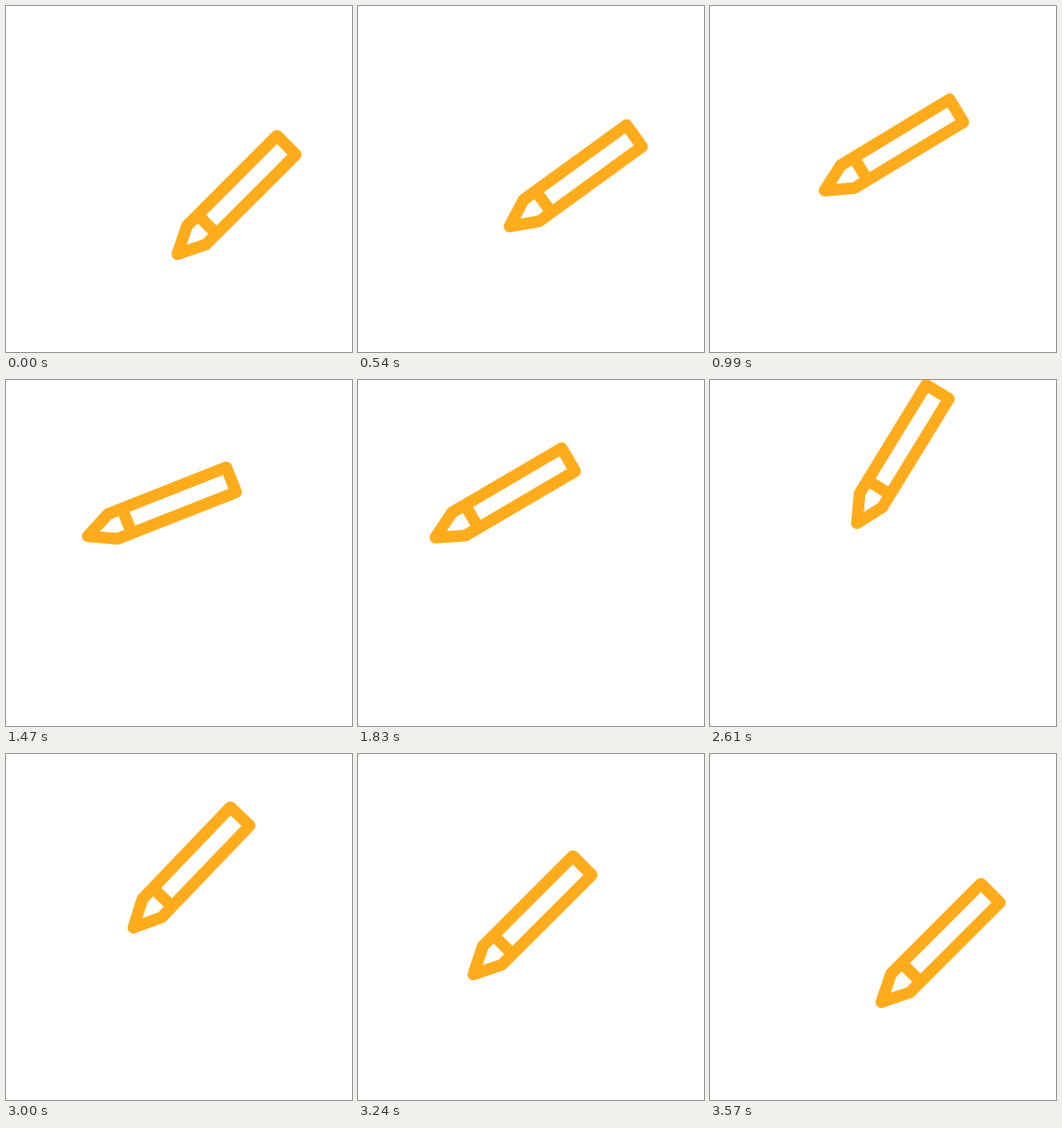
Write an HTML page that moves like this. It is 372 px wide and 372 px high and loops after 3.6 s.

```html
<!DOCTYPE html>
<html lang="en">
<head>
<meta charset="utf-8">
<title>Pencil</title>
<style>
  html, body { margin: 0; height: 100%; overflow: hidden; background: #fff; }
  svg { display: block; width: 100vw; height: 100vh; }
</style>
</head>
<body>
<svg viewBox="0 0 372 372">
  <!-- The tip is the origin and the body lies along the x axis -->
  <g id="pencil" fill="none" stroke="#ffac1c" stroke-width="12.6" stroke-linejoin="round">
    <path d="M0 0L29 -14.3H165.7V14.3H29Z M45.2 -14V14"/>
  </g>
</svg>
<script>
const LOOP = 3600, STEP = 30;
const pencil = document.getElementById('pencil');

// Smooth curve through [time, value] keys that rests at every turning point
function curve(keys) {
  const slope = i => (keys[i + 1][1] - keys[i][1]) / (keys[i + 1][0] - keys[i][0]);
  const tangent = i => {
    if (i === 0 || i === keys.length - 1) return 0;
    const a = slope(i - 1), b = slope(i);
    return a * b > 0 ? 2 * a * b / (a + b) : 0;
  };
  return t => {
    let i = 0;
    while (i < keys.length - 2 && t >= keys[i + 1][0]) i++;
    const [t0, v0] = keys[i], [t1, v1] = keys[i + 1];
    const d = t1 - t0, s = Math.min(1, (t - t0) / d), r = 1 - s;
    return v0 * r * r * (1 + 2 * s) + v1 * s * s * (3 - 2 * s)
      + d * s * r * (tangent(i) * r - tangent(i + 1) * s);
  };
}

const tipX = curve([[0, 184.3], [540, 163], [990, 123.3], [1080, 113.5], [1470, 88], [1620, 84],
  [1800, 83.2], [2130, 88.3], [2400, 91], [2610, 158], [2700, 199], [2780, 217],
  [3000, 137], [3120, 78], [3240, 124], [3570, 184.3]]);
const tipY = curve([[0, 266.8], [540, 237], [990, 198.5], [1080, 192], [1470, 168], [1620, 165],
  [2130, 177.3], [2400, 177], [2610, 154], [2740, 152], [3000, 186.7], [3240, 237], [3570, 266.8]]);
const angle = curve([[0, 45], [540, 36], [990, 31.2], [1080, 29.7], [1470, 21.5], [1620, 20],
  [2130, 53.2], [2400, 60], [2610, 58.5], [2780, 53], [3000, 46.2], [3240, 45], [3570, 45]]);

function draw() {
  const t = Math.floor(performance.now() % LOOP / STEP) * STEP;
  pencil.setAttribute('transform', `translate(${tipX(t)} ${tipY(t)}) rotate(${-angle(t)})`);
  requestAnimationFrame(draw);
}
draw();
</script>
</body>
</html>
```
